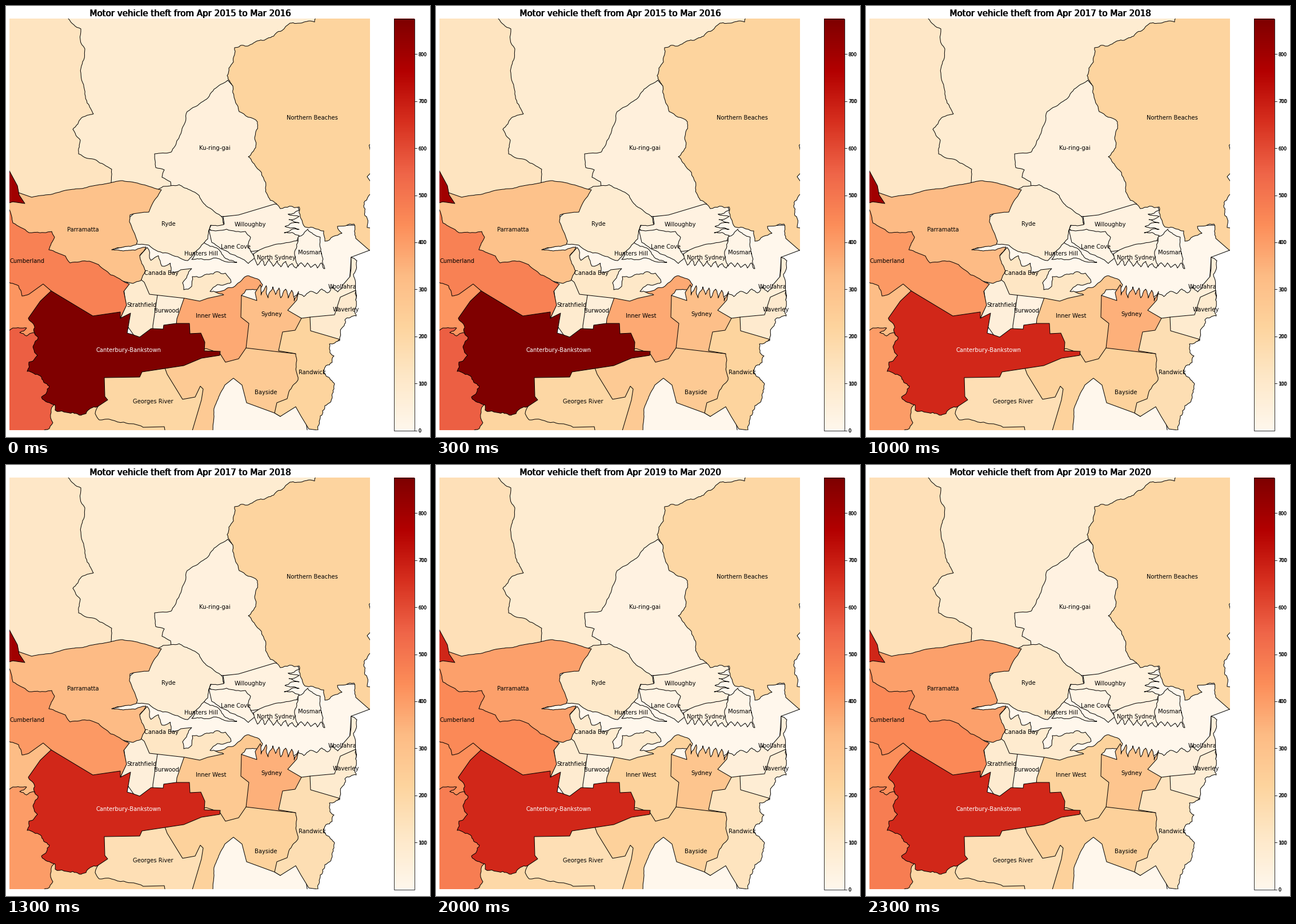
A matplotlib script that plays this animation: 742 by 755 pixels, repeating every 2.5 s.

```python
import matplotlib.pyplot as plt
import numpy as np
from matplotlib.animation import FuncAnimation
from matplotlib.patches import Polygon, Rectangle

W, H, DPI = 742, 755, 72
YEARS = range(2015, 2020)
CMAP, VMAX = plt.get_cmap("OrRd"), 875
LEFT, TOP, RIGHT, BOTTOM = 6, 22, 636.5, 743
BAR_X, BAR_W = 678.5, 36

fig = plt.figure(figsize=(W / DPI, H / DPI), dpi=DPI, facecolor="white")
ax = fig.add_axes([0, 0, 1, 1])
ax.axis("off")
rng = np.random.default_rng(4)
window = Rectangle((LEFT, TOP), RIGHT - LEFT, BOTTOM - TOP,
                   transform=ax.transData)
areas = []


def line(*flat):
    return np.array(flat, float).reshape(-1, 2)


def rough(amp, *flat):
    """Natural border: key points joined by midpoint displacement."""
    pts = line(*flat)
    for _ in range(4):
        out = [pts[0]]
        for a, b in zip(pts, pts[1:]):
            dx, dy = b - a
            if np.hypot(dx, dy) > 5:
                push = rng.uniform(-amp, amp)
                out.append((a + b) / 2 + push * np.array([-dy, dx]))
            out.append(b)
        pts = np.array(out)
    return pts


def inlets(x0, y0, x1, y1, count, depth):
    """Harbour shore: narrow bays of uneven depth along a line."""
    a, b = line(x0, y0, x1, y1)
    dx, dy = b - a
    inward = np.array([-dy, dx]) / np.hypot(dx, dy)
    steps = 2 * count
    pts = []
    for k in range(steps + 1):
        t = (k + rng.uniform(-0.25, 0.25) * (0 < k < steps)) / steps
        reach = depth * rng.uniform(0.6, 1.1) if k % 2 else 0
        pts.append(a + t * (b - a) + reach * inward)
    return rough(0.12, *np.ravel(pts))


def area(values, *parts, label="", at=(0, 0), ink="black"):
    """Add one area; each new one covers the loose edges of those below."""
    patch = Polygon(np.vstack(parts), ec="black", lw=1, joinstyle="round")
    ax.add_patch(patch)
    patch.set_clip_path(window)
    areas.append((patch, np.broadcast_to(values, len(YEARS))))
    ax.text(at[0], at[1] + 3, label, fontsize=10, ha="center", color=ink,
            zorder=5)


# North
area(85, line(-5, 0, 545, 0, 545, 40, 420, 330, -5, 330))
area((130, 115, 115, 143, 152),
     rough(0.09, 109, 22, 131, 40, 130, 59, 138, 75, 132, 105, 142, 170,
           153, 189, 132, 196, 117, 216, 130, 235, 127, 259, 158, 270,
           185, 286, 184, 308),
     line(190, 325, -5, 350, -5, 14, 100, 14))
area((48, 48, 42, 35, 36), line(470, 220, 480, 365, 340, 370),
     rough(0.08, 290, 325, 288, 308, 273, 300, 277, 287, 262, 283, 260, 259,
           289, 256, 308, 215, 317, 185, 345, 167, 388, 130),
     label="Ku-ring-gai", at=(365, 249))

# Harbour and its north shore
area(0, line(185, 427, 355, 385, 520, 345, 560, 385, 612, 384, 636, 428,
             604, 440, 600, 500, 500, 530, 300, 512, 235, 440))
area((35, 35, 40, 40, 45),
     line(359, 384, 382, 382, 380, 369, 407, 366, 470, 347, 510, 350),
     inlets(513, 358, 513, 402, 4, 24),
     line(505, 420, 430, 430, 365, 400, 356, 390),
     label="Willoughby", at=(427, 383))
area(14, rough(0.13, 345, 412, 372, 426, 380, 437, 404, 449, 385, 448,
               345, 444, 325, 444, 330, 425),
     label="Hunters Hill", at=(341, 434))
area(24, rough(0.08, 355, 392, 386, 391, 419, 395, 428, 405, 423, 420,
               437, 440, 424, 451, 392, 434, 360, 414),
     label="Lane Cove", at=(402.5, 422))
area((45, 38, 38, 38, 40),
     rough(0.05, 437, 447, 433, 434, 441, 429, 470, 418, 511, 411, 518, 440),
     inlets(508, 459, 440, 454, 5, 11),
     label="North Sydney", at=(473, 441))
area(16, rough(0.12, 511, 456, 511, 405, 528, 391, 550, 405, 553, 438, 558, 460),
     inlets(556, 460, 511, 456, 4, 9),
     label="Mosman", at=(532, 432))
area((222, 204, 218, 214, 203),
     rough(0.13, 540, 14, 540, 28, 497, 30, 483, 43, 440, 61, 400, 73, 398, 98,
           387, 122, 397, 140, 408, 185, 440, 203, 437, 248, 424, 264, 440, 285,
           454, 319, 480, 355, 513, 352, 516, 372, 523, 387, 537, 388, 556, 394,
           558, 412, 588, 398, 580, 386, 609, 382, 612, 407),
     line(636, 428, 645, 424, 645, 390),
     rough(0.2, 632, 388, 632, 372, 626, 350, 637, 330),
     line(645, 318, 632, 299, 645, 285, 635.5, 244, 645, 235, 645, 14),
     label="Northern Beaches", at=(535.5, 196))
area((85, 92, 72, 85, 105),
     rough(0.07, 262, 325, 275, 316, 303, 313, 338, 332, 350, 350, 379, 371,
           381, 383, 358, 384, 353, 408, 332, 430, 318, 446, 283, 433, 266, 430,
           250, 419, 225, 417),
     line(205, 380, 245, 345), label="Ryde", at=(284, 382))

# Inner suburbs
area((90, 85, 55, 60, 88),
     line(207, 487, 245, 470, 270, 510, 257, 572, 233, 590, 205, 550, 201, 545,
          210, 524, 206, 495), label="Strathfield", at=(238, 524))
area((55, 30, 35, 35, 35),
     line(266, 500, 316, 505, 305, 560, 274, 570, 257, 566, 257, 560),
     label="Burwood", at=(281, 534))
area((370, 265, 268, 245, 225),
     line(313, 508, 299, 548, 298, 560, 340, 630, 389, 635, 430, 610, 430, 520),
     rough(0.1, 412, 507, 420, 497, 443, 499, 449, 488, 440, 478, 421, 473,
           397, 493, 375, 500), label="Inner West", at=(358.5, 543))
area((110, 95, 120, 85, 92), line(230, 474, 232, 440, 247, 423),
     inlets(250, 427, 306, 462, 3, 13),
     rough(0.15, 325, 460, 309, 485, 311, 497, 325, 491, 326, 474, 355, 470,
           384, 468, 394, 484, 370, 488, 357, 500, 381, 506),
     line(353, 512, 339, 517, 313, 512, 251, 505, 242, 484),
     label="Canada Bay", at=(272, 468))

# East
area((62, 58, 60, 55, 55),
     rough(0.12, 604, 440, 614, 446, 608, 470, 612, 500, 600, 540),
     line(520, 555, 480, 525), inlets(512, 504, 590, 488, 4, 10),
     line(602, 474, 604, 460), label="Woollahra", at=(588.5, 492))
area((95, 85, 92, 88, 75),
     line(532, 545, 575, 541, 585, 510, 612, 498),
     rough(0.16, 612, 498, 613, 543, 593, 550, 584, 586),
     line(565, 590, 525, 575), label="Waverley", at=(594.5, 532))
area((310, 355, 355, 388, 285),
     line(411, 545, 412, 507, 439, 516, 436, 502),
     inlets(445, 488, 512, 500, 6, 20),
     line(509, 515, 493, 533, 517, 547, 520, 570, 500, 620, 420, 620, 420, 600,
          425, 556), label="Sydney", at=(465, 540))
area(0, line(355, 760, 355, 660, 398, 640, 480, 705, 520, 700, 530, 760))
area((260, 228, 228, 214, 232),
     line(270, 625, 350, 600, 374, 608, 384, 624, 407, 618, 420, 599, 478, 606,
          515, 610, 520, 660, 500, 695, 480, 719, 470, 713, 421, 695, 413, 664),
     rough(0.04, 398, 652, 383, 664, 364, 705, 363, 760),
     line(300, 760), label="Bayside", at=(454.5, 677))
area((220, 200, 165, 182, 135),
     rough(0.22, 584, 584, 566, 592, 574, 613, 560, 630, 560, 648, 575, 662,
           571, 685, 550, 718, 546, 743),
     line(530, 741, 516, 718, 507, 702, 480, 719, 470, 713, 474, 695, 492, 688),
     rough(0.1, 495, 676, 511, 655, 508, 640, 507, 609),
     line(477, 604, 484, 571, 506, 568, 517, 547, 532, 545, 533, 569),
     label="Randwick", at=(536, 642))

# South and west
area((215, 185, 215, 185, 195), line(70, 690, 180, 680, 326, 715, 326, 760, 60, 760))
area((205, 130, 160, 172, 160),
     line(165, 645, 278, 634, 282, 645, 309, 689, 331, 685, 340, 666, 345, 671,
          342, 690, 326, 744, 281, 760, 277, 737),
     rough(0.08, 240, 738, 206, 729, 163, 725, 156, 714, 162, 700),
     label="Georges River", at=(257, 693))
area((300, 295, 325, 345, 390), line(-5, 325, 22, 327),
     rough(0.04, 45, 335, 110, 322, 158, 314, 204, 306, 272, 322, 258, 343,
           250, 361, 217, 366, 216, 378, 230, 412),
     rough(0.06, 228, 418, 185, 427, 205, 429, 245, 422, 234, 437, 244, 464,
           236, 481, 222, 486),
     line(60, 450, -5, 450), label="Parramatta", at=(134.5, 392))
area((420, 385, 320, 328, 435), line(-5, 470, 50, 470, 90, 510, 60, 590, -5, 590))
area((470, 390, 410, 410, 450),
     rough(0.06, -5, 350, 6, 357, 12, 380, 40, 397, 80, 395, 85, 405, 75, 427,
           104, 438, 112, 450, 146, 447, 162, 453, 208, 484),
     line(216, 487, 206, 500, 211, 524, 201, 545, 152, 555, 79, 499, 65, 487),
     rough(0.12, 40, 505, 28, 508, 22, 490, -5, 478),
     label="Cumberland", at=(37, 447))
area((560, 400, 400, 400, 480),
     rough(0.12, -5, 574, 12, 564, 36, 564, 24, 572, 36, 578, 48, 572),
     line(90, 600, 100, 690),
     rough(0.18, 86, 697, 79, 712, 82, 730, 60, 750),
     line(-5, 760))
area((875, 705, 675, 580, 675),
     line(60, 517, 79, 499, 152, 543, 200, 536, 200, 547, 218, 538, 212, 573,
          220, 575, 234, 580, 254, 565, 275, 566, 276, 559, 298, 556, 321, 556,
          322, 574, 341, 573, 348, 589, 347, 604, 375, 605, 374, 612, 342, 617,
          311, 630, 238, 641, 234, 650, 172, 651, 173, 684, 178, 690),
     rough(0.17, 160, 702, 117, 712, 86, 708, 86, 699, 62, 685, 76, 666, 60, 648,
           37, 640, 40, 624, 55, 612, 48, 600, 56, 580, 48, 557, 39, 547),
     label="Canterbury-Bankstown", at=(214, 603), ink="white")
area((800, 800, 800, 790, 680),
     line(-5, 270, 6, 289, 20, 315, 23, 331, 33, 346, 12, 343, -5, 348))


def heavy_text(x, y, s, size, **kw):
    """Text laid down twice, one pixel apart."""
    return [ax.text(x + dx, y, s, fontsize=size, **kw) for dx in (0, 1)]


# Colour scale
bar_h = BOTTOM - TOP
ax.imshow(np.linspace(1, 0, 256)[:, None], cmap=CMAP, aspect="auto",
          extent=(BAR_X, BAR_X + BAR_W, BOTTOM + 0.5, TOP + 0.5))
ax.add_patch(Rectangle((BAR_X, TOP + 0.5), BAR_W, bar_h, fill=False, lw=0.8))
zero = []
for value in range(0, VMAX, 100):
    y = BOTTOM + 0.5 - bar_h * value / VMAX
    tick = ax.plot([BAR_X + BAR_W, BAR_X + BAR_W + 4], [y, y], "k", lw=0.8)
    texts = heavy_text(721, y, str(value), 8, va="center_baseline")
    zero = zero or tick + texts

title = heavy_text(322, 18, "", 15, ha="center")
ax.set_xlim(0, W)
ax.set_ylim(H, 0)


def draw(i):
    for patch, values in areas:
        patch.set_facecolor(CMAP(values[i] / VMAX))
    for t in title:
        t.set_text(f"Motor vehicle theft from Apr {YEARS[i]} to Mar {YEARS[i] + 1}")
    for part in zero:
        part.set_visible(i in (0, len(YEARS) - 1))
    return [patch for patch, _ in areas] + title + zero


anim = FuncAnimation(fig, draw, frames=len(YEARS), interval=500,
                     repeat=True, repeat_delay=0, blit=False)
plt.show()
```
